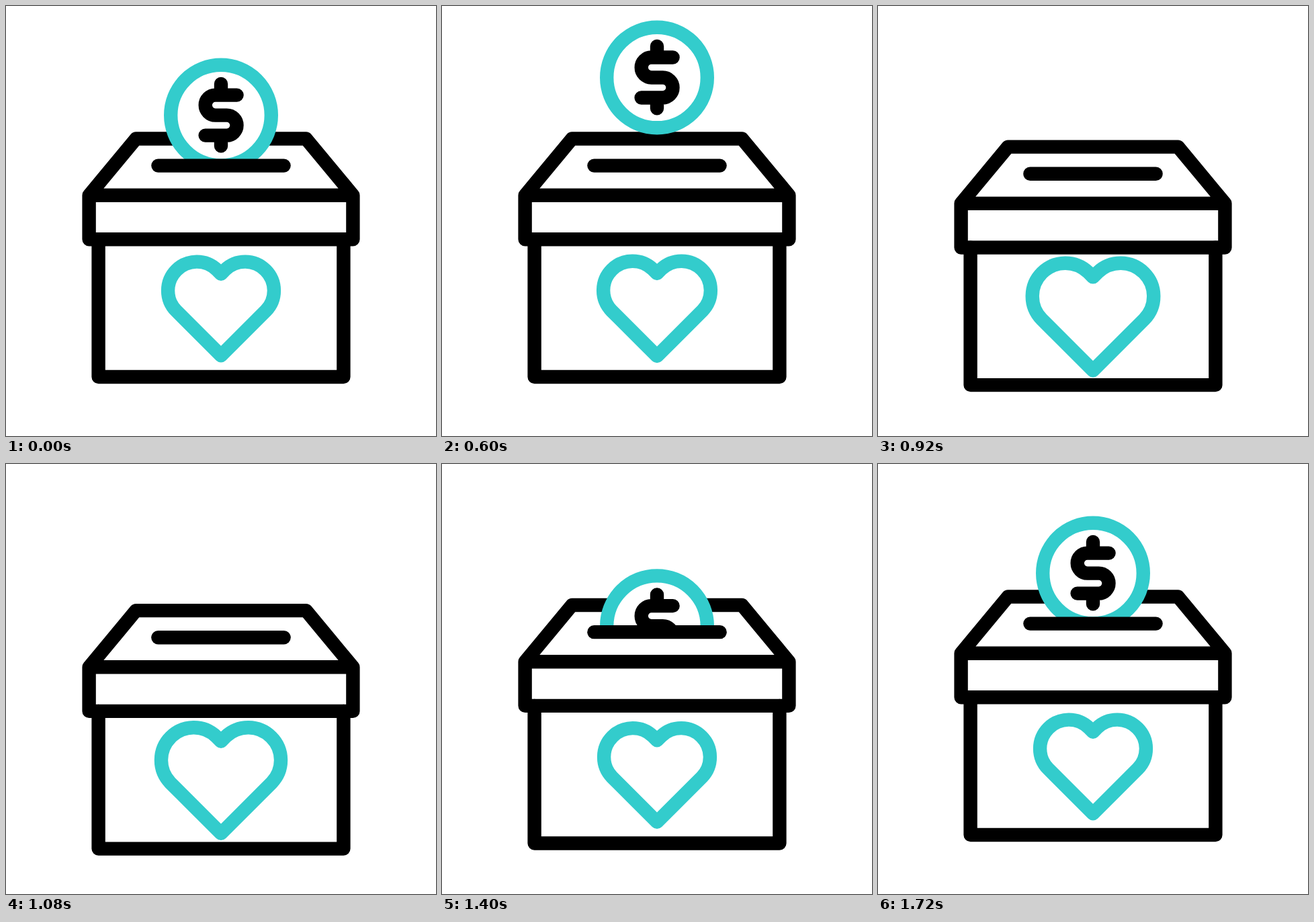
These frames come from a looping animation (640 px wide and 640 px high, 1840 ms). An HTML page:

```html
<!DOCTYPE html>
<html lang="en">
<head>
<meta charset="utf-8">
<title>Donation box</title>
<style>
  html, body { margin: 0; width: 100%; height: 100%; overflow: hidden; background: #fff; }
  svg { display: block; width: 100vw; height: 100vh; }
  .line { fill: none; stroke: #000; stroke-width: 20.4; stroke-linecap: round; stroke-linejoin: round; }
  .teal { stroke: #33cccc; }
  .solid { fill: #fff; }
</style>
</head>
<body>
<svg viewBox="0 0 640 640">
  <defs>
    <clipPath id="above"><rect id="mask" width="640" height="237.6"/></clipPath>
  </defs>
  <g class="box line">
    <path d="M137.6 347.3V552H502.4V347.3"/>
    <path d="M123.6 281.7L193.5 197.5H446.5L516.4 281.7V347.3H123.6ZH516.4"/>
    <path id="heart" class="teal" d="M320 520.3L253.1 453.4A43 43 0 0 1 313.9 392.6L320 398.7L326.1 392.6A43 43 0 0 1 386.9 453.4Z"/>
  </g>
  <g clip-path="url(#above)">
    <g id="coin" class="line">
      <circle class="teal solid" cx="320" cy="162.6" r="74.8"/>
      <path d="M343.6 132.6H311.7a15 15 0 0 0 0 30h16.8a15 15 0 0 1 0 30H296.6M320 116v16.6M320 192.6V208.4"/>
    </g>
  </g>
  <path class="box line" d="M226.4 237.6H413.6"/>
</svg>
<script>
const LOOP = 1840, STEP = 40, STROKE = 20.4;

// Rows of [time in ms, value]; every stretch is eased in and out.
const COIN_Y = [[115, 0], [511, -62.5], [1050, 182.5], [1718, 0]];
const BOX_Y = [[690, 0], [1125, 20.8], [1718, 0]];
const HEART_SCALE = [[80, 1], [380, 1.15], [680, 1], [980, 1.15], [1280, 1]];

const $ = id => document.getElementById(id);
const boxes = document.querySelectorAll('.box');

// cubic-bezier(.66, 0, .34, 1), solved by bisection
function ease(x) {
  let lo = 0, hi = 1;
  for (let i = 0; i < 24; i++) {
    const p = (lo + hi) / 2, q = 1 - p;
    if (1.98 * q * q * p + 1.02 * q * p * p + p * p * p < x) lo = p;
    else hi = p;
  }
  return lo * lo * (3 - 2 * lo);
}

function valueAt(keys, t) {
  if (t <= keys[0][0]) return keys[0][1];
  for (let i = 1; i < keys.length; i++) {
    const [t0, a] = keys[i - 1], [t1, b] = keys[i];
    if (t < t1) return a + (b - a) * ease((t - t0) / (t1 - t0));
  }
  return keys[keys.length - 1][1];
}

function draw(t) {
  const dip = valueAt(BOX_Y, t), scale = valueAt(HEART_SCALE, t);
  boxes.forEach(b => b.setAttribute('transform', `translate(0 ${dip})`));
  $('mask').setAttribute('height', 237.6 + dip);
  $('coin').setAttribute('transform', `translate(0 ${valueAt(COIN_Y, t)})`);
  $('heart').setAttribute('transform', `translate(320 450.2) scale(${scale}) translate(-320 -450.2)`);
  $('heart').style.strokeWidth = STROKE / scale;
}

let start;
function tick(now) {
  start ??= now;
  const t = (now - start) % LOOP;
  draw(Math.floor(t / STEP) * STEP);
  requestAnimationFrame(tick);
}
draw(0);
requestAnimationFrame(tick);
</script>
</body>
</html>
```
